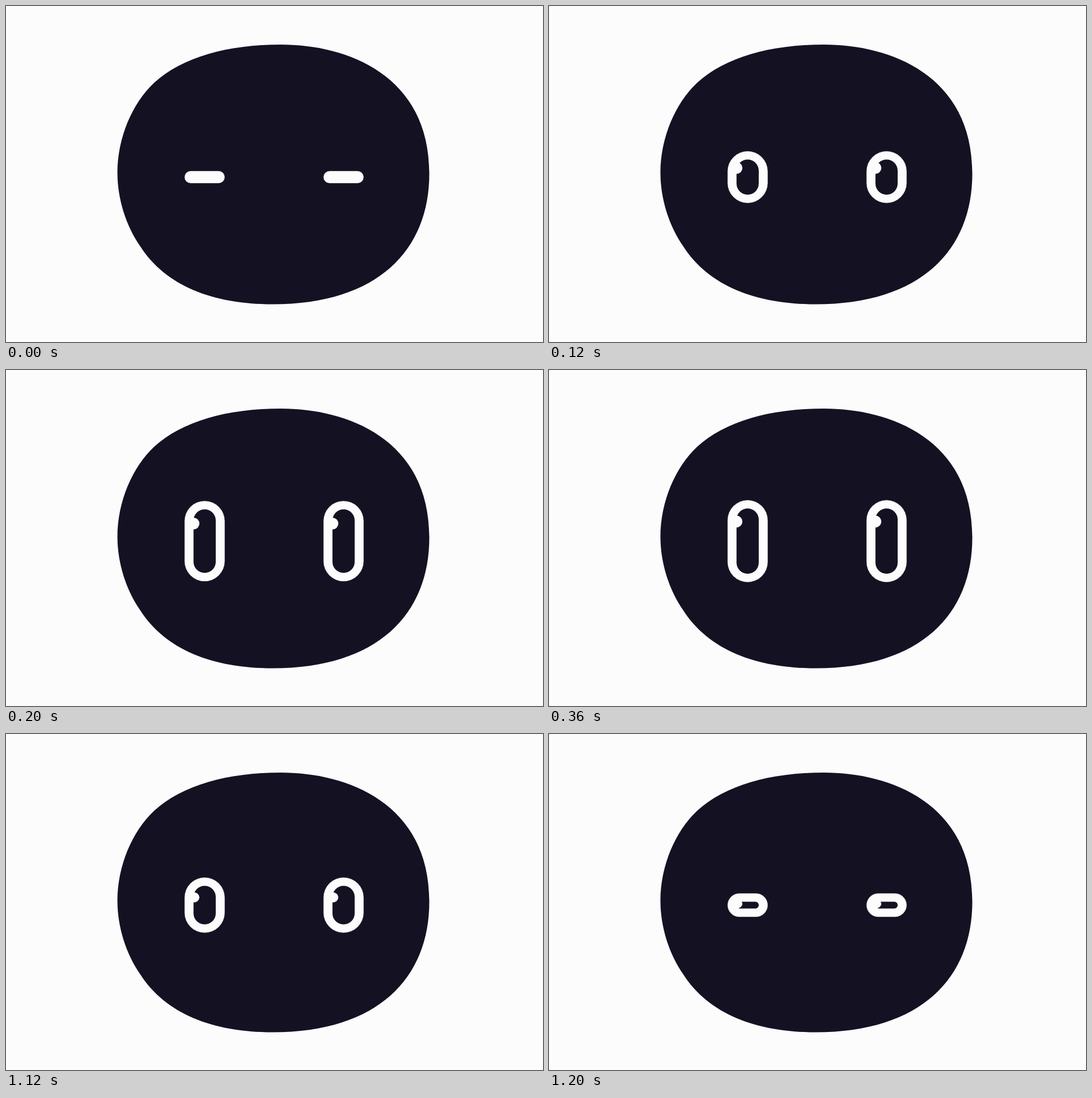
These frames come from a looping animation (947x592 px, 1240 ms). An HTML page with a canvas:

```html
<!DOCTYPE html>
<html lang="en">
<head>
<meta charset="utf-8">
<title>Blinking face</title>
<style>
html, body { margin: 0; width: 100%; height: 100%; overflow: hidden; background: #fcfcfc; }
canvas { display: block; width: 947px; height: 592px; }
</style>
</head>
<body>
<canvas id="stage" width="947" height="592"></canvas>
<script>
const ctx = document.getElementById('stage').getContext('2d');
const LOOP = 1240, TICK = 40;
const LIGHT = '#fcfcfc', DARK = '#141222';
const EYE_Y = 301.5, EYE_W = 70.4, RIM_X = 15.6, RIM_Y = 14.5;
const CLOSED = 21, OPEN = 144;
const GLINT_R = 10.4, GLINT_LIFT = 34.5;

const head = new Path2D(
  'M196.5 294 C196.5 232 223 171 261 135.5 C311 90 390 68 485 68 ' +
  'C602 68 746.5 122 746.5 295 C746.5 430 656 525.5 470 525.5 ' +
  'C365 525.5 281 493 236.5 423 C212 388 196.5 340 196.5 294 Z');

const progress = (t, start, length) => Math.min(Math.max((t - start) / length, 0), 1);
const easeInOut = u => u * u * (3 - 2 * u);
const easeOut = (u, power) => 1 - (1 - u) ** power;

function pose(t) {
  const open = easeInOut(progress(t, 0, 220)) - easeOut(progress(t, 1072, 195), 1.7);
  const rise = easeInOut(progress(t, 0, 250));
  const sink = easeOut(progress(t, 1055, 245), 3);
  return {
    height: CLOSED + (OPEN - CLOSED) * open,
    glintY: EYE_Y - GLINT_LIFT * (rise - sink),
    glintR: GLINT_R - 2.4 * sink
  };
}

function pill(x, w, h) {
  ctx.beginPath();
  ctx.roundRect(x, EYE_Y - h / 2, w, h, Math.min(w, h) / 2);
}

function drawEye(x, { height, glintY, glintR }) {
  pill(x, EYE_W, height);
  ctx.fillStyle = LIGHT;
  ctx.fill();
  ctx.strokeStyle = 'rgba(252, 252, 252, 0.35)';
  ctx.lineWidth = 1;
  ctx.stroke();

  const innerH = height - 2 * RIM_Y;
  if (innerH <= 0) return;
  ctx.save();
  pill(x + RIM_X, EYE_W - 2 * RIM_X, innerH);
  ctx.fillStyle = DARK;
  ctx.fill();
  pill(x, EYE_W, height);
  ctx.clip();
  ctx.beginPath();
  ctx.ellipse(x + RIM_X, glintY, GLINT_R, glintR, 0, 0, Math.PI * 2);
  ctx.fillStyle = LIGHT;
  ctx.fill();
  ctx.restore();
}

function draw(now) {
  const t = Math.floor((now % LOOP) / TICK) * TICK;
  const eye = pose(t);
  ctx.fillStyle = LIGHT;
  ctx.fillRect(0, 0, 947, 592);
  ctx.fillStyle = DARK;
  ctx.fill(head);
  drawEye(315.1, eye);
  drawEye(560.1, eye);
  requestAnimationFrame(draw);
}
requestAnimationFrame(draw);
</script>
</body>
</html>
```
